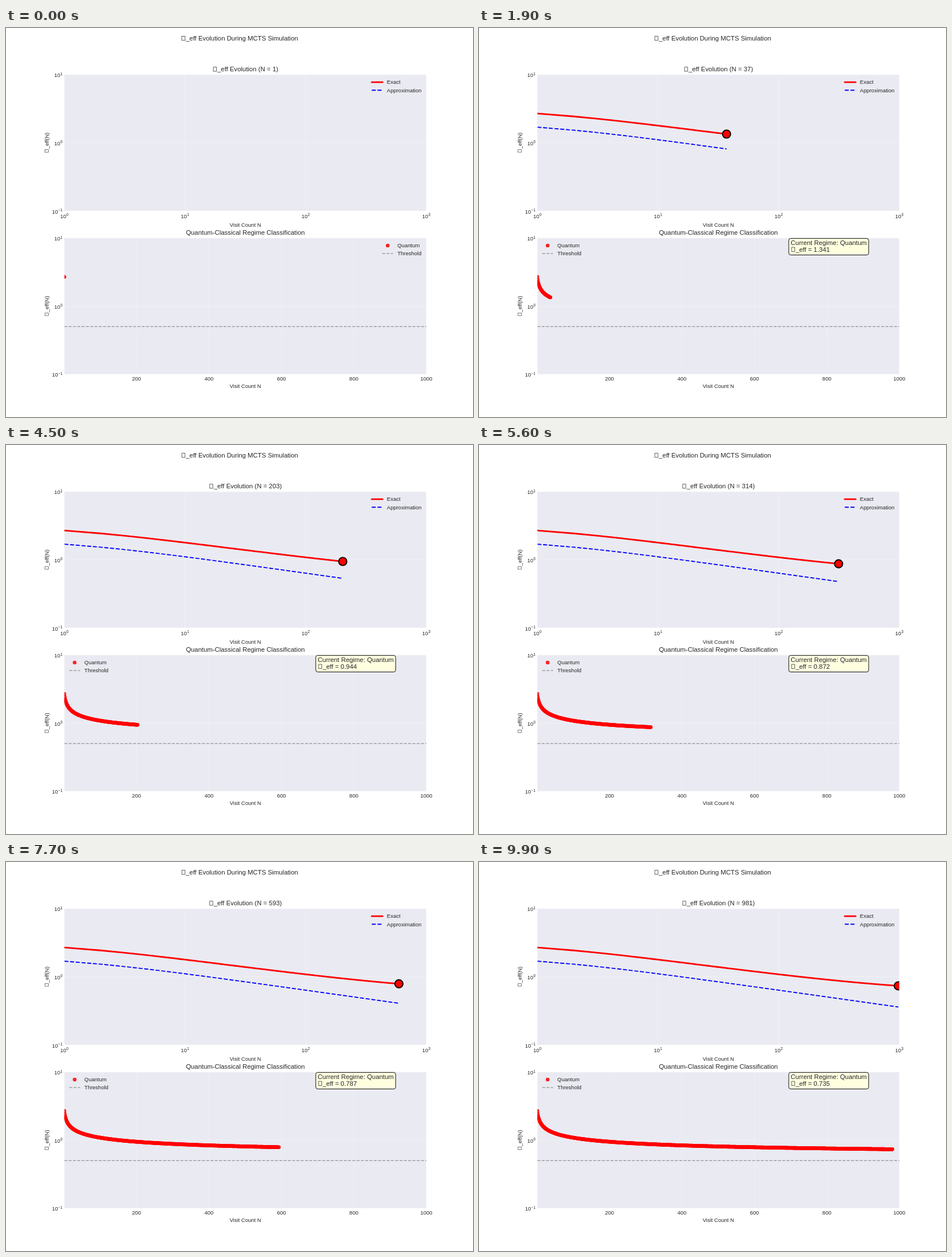
Write an HTML page with a canvas that moves like this. It is 820 px wide and 683 px high and loops after 10000 ms.

```html
<!DOCTYPE html>
<html lang="en">
<head>
<meta charset="utf-8">
<title>Effective constant evolution</title>
<style>
html, body { margin: 0; width: 100%; height: 100%; overflow: hidden; background: #fff; }
canvas { display: block; width: 820px; height: 683px; }
</style>
</head>
<body>
<canvas id="stage" width="820" height="683"></canvas>
<script>
const ctx = document.getElementById('stage').getContext('2d');
const PT = 820 / 12 / 72;            // one point in pixels
const SMALL = 10 * PT, BIG = 12 * PT;
const INK = '#262626';
const LEFT = 102.5, WIDE = 635.5, RIGHT = LEFT + WIDE, HIGH = 239.05;
const TOP1 = 81.96, TOP2 = 368.82;
const LOOP = 10000, STEP = 100;

const exact = n => 1 / Math.acos(Math.exp(-0.05 * Math.sqrt(n + 1)));
const approx = n => 2 / Math.PI / Math.sqrt(0.1 * Math.sqrt(n + 1));
const logX = n => LEFT + WIDE * Math.log10(n) / 3;
const linX = n => LEFT + WIDE * (n - 1) / 999;
const logY = (v, top) => top + HIGH * (1 - Math.log10(v)) / 2;

function setFont(size) {
  ctx.font = size + 'px "Liberation Sans", Arial, sans-serif';
}

// align: 0 left, 0.5 centre, 1 right; boxed puts an empty glyph box in front
function label(str, x, y, size, align = 0, boxed = false) {
  setFont(size);
  const lead = boxed ? 0.75 * size : 0;
  x -= align * (lead + ctx.measureText(str).width);
  ctx.fillStyle = INK;
  ctx.fillText(str, x + lead, y);
  if (boxed) {
    ctx.strokeStyle = INK;
    ctx.lineWidth = 0.065 * size;
    ctx.strokeRect(x + 0.14 * size, y - 0.67 * size, 0.48 * size, 0.65 * size);
  }
}

function power(exp, x, y, align) {
  const sup = 0.7 * SMALL;
  setFont(SMALL);
  const base = ctx.measureText('10').width;
  setFont(sup);
  x -= align * (base + ctx.measureText(exp).width + 0.3);
  label('10', x, y, SMALL);
  label(exp, x + base + 0.3, y - 3.8, sup);
}

function line(points, color, width, dashed) {
  ctx.strokeStyle = color;
  ctx.lineWidth = width * PT;
  ctx.lineJoin = 'round';
  ctx.lineCap = dashed ? 'butt' : 'round';
  ctx.setLineDash(dashed ? [3.7 * width * PT, 1.6 * width * PT] : []);
  ctx.beginPath();
  for (const [x, y] of points) ctx.lineTo(x, y);
  ctx.stroke();
  ctx.setLineDash([]);
}

function disc(x, y, r, fill, edge, width) {
  ctx.beginPath();
  ctx.arc(x, y, r, 0, 2 * Math.PI);
  ctx.fillStyle = fill;
  ctx.fill();
  ctx.strokeStyle = edge;
  ctx.lineWidth = width * PT;
  ctx.stroke();
}

const RED = 'rgba(255,0,0,0.8)';
const GRAY = 'rgba(128,128,128,0.7)';
const dot = (x, y) => disc(x, y, Math.sqrt(30) / 2 * PT, RED, RED, 1.5);

function panel(top, gridX) {
  ctx.fillStyle = '#eaeaf2';
  ctx.fillRect(LEFT, top, WIDE, HIGH);
  clipped(top, () => {
    const grid = 'rgba(255,255,255,0.3)';
    for (const x of gridX) line([[x, top], [x, top + HIGH]], grid, 1);
    for (const v of [10, 1, 0.1]) {
      const y = logY(v, top);
      line([[LEFT, y], [RIGHT, y]], grid, 1);
    }
  });
  ['1', '0', '\u22121'].forEach((e, i) => power(e, 99.2, top + i * HIGH / 2 + 4.5, 1));
  ctx.save();
  ctx.translate(74.7, top + HIGH / 2);
  ctx.rotate(-Math.PI / 2);
  label('_eff(N)', 0, 0, SMALL, 0.5, true);
  ctx.restore();
}

function clipped(top, draw) {
  ctx.save();
  ctx.beginPath();
  ctx.rect(LEFT, top, WIDE, HIGH);
  ctx.clip();
  draw();
  ctx.restore();
}

// legend handle starts at x, its text follows
function legendRow(text, x, y, drawHandle) {
  drawHandle(x, x + 2 * SMALL, y - 3.25);
  label(text, x + 2.8 * SMALL, y, SMALL);
}

function legendX(widest) {
  setFont(SMALL);
  return RIGHT - 3.7 * SMALL - ctx.measureText(widest).width;
}

function curvePanel(n) {
  const mid = LEFT + WIDE / 2;
  panel(TOP1, [1, 10, 100, 1000].map(logX));
  ['0', '1', '2', '3'].forEach((e, i) => power(e, LEFT + i * WIDE / 3, 334, 0.5));
  label('Visit Count N', mid, 348.5, SMALL, 0.5);
  label(`_eff Evolution (N = ${n})`, mid, 76.3, BIG, 0.5, true);

  if (n > 1) clipped(TOP1, () => {
    const trace = f => Array.from({ length: n }, (_, i) => [logX(i + 1), logY(f(i + 1), TOP1)]);
    line(trace(exact), '#f00', 3);
    line(trace(approx), '#00f', 2, true);
    disc(logX(n), logY(exact(n), TOP1), 7.5 * PT, '#f00', '#000', 2);
  });

  const x = legendX('Approximation');
  legendRow('Exact', x, 98.4, (a, b, y) => line([[a, y], [b, y]], '#f00', 3));
  legendRow('Approximation', x, 112.5, (a, b, y) => line([[a, y], [b, y]], '#00f', 2, true));
}

function regimePanel(n) {
  const mid = LEFT + WIDE / 2;
  const ticks = [200, 400, 600, 800, 1000];
  panel(TOP2, ticks.map(linX));
  for (const t of ticks) label(String(t), linX(t), 619, SMALL, 0.5);
  label('Visit Count N', mid, 632, SMALL, 0.5);
  label('Quantum-Classical Regime Classification', mid, 363.1, BIG, 0.5);

  clipped(TOP2, () => {
    for (let i = 1; i <= n; i++) dot(linX(i), logY(exact(i), TOP2));
    const y = logY(0.5, TOP2);
    line([[LEFT, y], [RIGHT, y]], GRAY, 1.5, true);
  });

  if (n > 1) note(exact(n));

  const x = n > 1 ? LEFT + 0.9 * SMALL : legendX('Threshold');
  legendRow('Quantum', x, 385.1, (a, b, y) => dot((a + b) / 2, y + 0.1));
  legendRow('Threshold', x, 399.3, (a, b, y) => line([[a, y], [b, y]], GRAY, 1.5, true));
}

function note(value) {
  const x = LEFT + 0.7 * WIDE, pad = 0.3 * BIG, text = 'Current Regime: Quantum';
  setFont(BIG);
  ctx.beginPath();
  ctx.roundRect(x - pad, 369.4, ctx.measureText(text).width + 2 * pad, 29.1, pad);
  ctx.fillStyle = '#ffffe0';
  ctx.fill();
  ctx.strokeStyle = '#000';
  ctx.lineWidth = PT;
  ctx.stroke();
  label(text, x, 381, BIG);
  label('_eff = ' + value.toFixed(3), x, 392.7, BIG, 0, true);
}

let shown = -1;
function tick() {
  const step = Math.floor(performance.now() % LOOP / STEP);
  if (step !== shown) {
    shown = step;
    const n = 1 + Math.floor(1000 * (step / 100) ** 2);
    ctx.fillStyle = '#fff';
    ctx.fillRect(0, 0, 820, 683);
    label('_eff Evolution During MCTS Simulation', 410, 22, BIG, 0.5, true);
    curvePanel(n);
    regimePanel(n);
  }
  requestAnimationFrame(tick);
}
tick();
</script>
</body>
</html>
```
